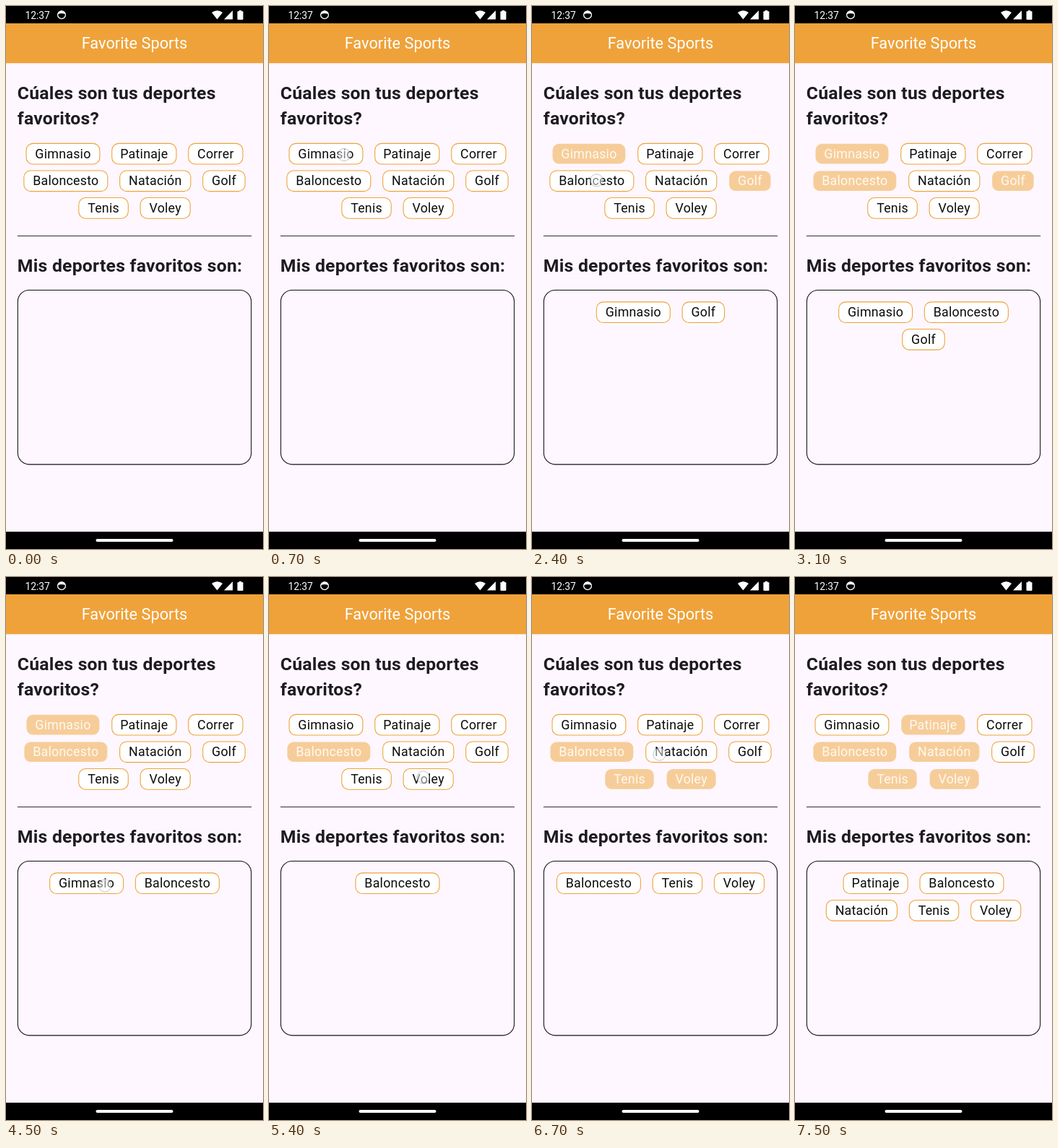
An HTML page with a canvas that plays this animation: 356x752 px, repeating every 8000 ms.

```html
<!DOCTYPE html>
<html lang="es">
<head>
<meta charset="utf-8">
<title>Favorite Sports</title>
<style>
  html, body { margin: 0; width: 100%; height: 100%; overflow: hidden; background: #fef7ff; }
  canvas { display: block; width: 356px; height: 752px; }
</style>
</head>
<body>
<canvas id="stage"></canvas>
<script>
const W = 356, H = 752, LOOP = 8000;
const DP = W / 360; // layout is in units of a 360-wide screen
const ORANGE = '#efa23a', FADED = '#f6cd99', PAGE = '#fef7ff', INK = '#1d1b20';
const FONT = 'Roboto, "Noto Sans", sans-serif';

const SPORTS = ['Gimnasio', 'Patinaje', 'Correr', 'Baloncesto', 'Natación', 'Golf', 'Tenis', 'Voley'];
const FIXED_WIDTH = { Patinaje: 91.2 };

// Each tap shows a pointer, then toggles a sport on release.
const HOLD = 200;
const TAPS = [
  { at: 600, sport: 'Gimnasio', x: 104, y: 206 },
  { at: 1600, sport: 'Golf', x: 302.5, y: 238 },
  { at: 2400, sport: 'Baloncesto', x: 89.5, y: 241.5 },
  { at: 3900, sport: 'Golf', x: 181, y: 463 },
  { at: 4500, sport: 'Gimnasio', x: 137, y: 427.5 },
  { at: 5400, sport: 'Voley', x: 213.5, y: 277.5 },
  { at: 6000, sport: 'Tenis', x: 137, y: 281 },
  { at: 6700, sport: 'Natación', x: 176.5, y: 245.5 },
  { at: 7200, sport: 'Patinaje', x: 192, y: 206 }
];

const canvas = document.getElementById('stage');
const ratio = window.devicePixelRatio || 1;
canvas.width = W * ratio;
canvas.height = H * ratio;
const ctx = canvas.getContext('2d');

function setFont(size, weight, spacing) {
  ctx.font = `${weight} ${size}px ${FONT}`;
  ctx.letterSpacing = spacing + 'px';
}

function text(str, x, y, color) {
  ctx.fillStyle = color;
  ctx.fillText(str, x, y);
}

function rect(x, y, w, h, color) {
  ctx.fillStyle = color;
  ctx.fillRect(x, y, w, h);
}

function roundRect(x, y, w, h, r) {
  ctx.beginPath();
  ctx.roundRect(x, y, w, h, r);
}

function polygon(points) {
  ctx.beginPath();
  points.forEach(([x, y]) => ctx.lineTo(x, y));
  ctx.fill();
}

function chip(name, x, y, w, faded) {
  if (faded) {
    roundRect(x + 1, y + 1, w - 2, 28, 9);
    ctx.fillStyle = FADED;
    ctx.fill();
  } else {
    roundRect(x + 0.5, y + 0.5, w - 1, 29, 9.5);
    ctx.fillStyle = '#fff';
    ctx.fill();
    ctx.strokeStyle = ORANGE;
    ctx.lineWidth = 1.1;
    ctx.stroke();
  }
  const pad = (w - ctx.measureText(name).width) / 2;
  text(name, x + pad, y + 21, faded ? '#fff8f2' : '#0c0b0d');
}

// Centred rows that wrap at the given width.
function wrap(names, top, maxWidth, isFaded) {
  setFont(18, 400, 0.25);
  const rows = [];
  for (const name of names) {
    const w = FIXED_WIDTH[name] || ctx.measureText(name).width + 26;
    let row = rows[rows.length - 1];
    if (!row || row.width + 16 + w > maxWidth) {
      row = { width: -16, items: [] };
      rows.push(row);
    }
    row.items.push({ name, w });
    row.width += 16 + w;
  }
  rows.forEach((row, i) => {
    let x = 180 - row.width / 2;
    for (const { name, w } of row.items) {
      chip(name, x, top + i * 38, w, isFaded(name));
      x += w + 16;
    }
  });
}

function statusBar() {
  rect(0, 0, W, 24, '#000');
  setFont(13.8, 400, 0);
  text('12:37', 26.5, 17.8, '#fff');

  ctx.strokeStyle = '#fff';
  ctx.lineWidth = 1.3;
  ctx.beginPath();
  ctx.arc(77, 12.2, 5.4, 0, 7);
  ctx.stroke();
  ctx.beginPath();
  ctx.arc(77, 12.2, 5.4, Math.PI * 1.05, Math.PI * 1.95);
  ctx.quadraticCurveTo(77, 9, 71.7, 11.4);
  ctx.fill();

  ctx.beginPath();
  ctx.moveTo(292.5, 18.5);
  ctx.lineTo(285, 9);
  ctx.quadraticCurveTo(292.5, 3.4, 300, 9);
  ctx.fill();
  polygon([[302, 18.5], [314, 18.5], [314, 6.3]]);
  roundRect(320.5, 7.3, 8, 11.7, 1);
  ctx.fill();
  ctx.fillRect(322.8, 6, 3.4, 2);
}

function page(selected) {
  ctx.save();
  ctx.scale(DP, DP);

  setFont(22, 400, 0);
  ctx.textAlign = 'center';
  text('Favorite Sports', 180, 59.2, '#fff');
  ctx.textAlign = 'left';

  setFont(25, 700, 0.25);
  text('Cúales son tus deportes', 16, 130, INK);
  text('favoritos?', 16, 166, INK);
  text('Mis deportes favoritos son:', 16, 372, INK);

  wrap(SPORTS, 192, 328, name => selected.has(name));
  rect(16, 321.5, 328, 1, '#2a282c');

  roundRect(16.5, 398, 327, 244, 16);
  ctx.strokeStyle = '#111';
  ctx.lineWidth = 1.1;
  ctx.stroke();
  wrap(SPORTS.filter(name => selected.has(name)), 414, 296, () => false);

  ctx.restore();
}

function pointer({ x, y }) {
  ctx.beginPath();
  ctx.arc(x, y, 8.6, 0, 7);
  ctx.fillStyle = 'rgba(255,255,255,.5)';
  ctx.fill();
  ctx.strokeStyle = 'rgba(125,138,160,.5)';
  ctx.lineWidth = 1;
  ctx.stroke();
}

function draw(t) {
  const selected = new Set();
  for (const { at, sport } of TAPS) {
    if (t >= at + HOLD && !selected.delete(sport)) selected.add(sport);
  }

  ctx.setTransform(ratio, 0, 0, ratio, 0, 0);
  rect(0, 0, W, H, PAGE);
  rect(0, 24, W, 55.2, ORANGE);
  statusBar();
  page(selected);

  rect(0, 728, W, 24, '#000');
  roundRect(124.5, 738, 107, 4, 2);
  ctx.fillStyle = '#fff';
  ctx.fill();

  const tap = TAPS.find(({ at }) => t >= at && t < at + HOLD);
  if (tap) pointer(tap);
}

const start = performance.now();
function tick() {
  draw((performance.now() - start) % LOOP);
  requestAnimationFrame(tick);
}
tick();
</script>
</body>
</html>
```
